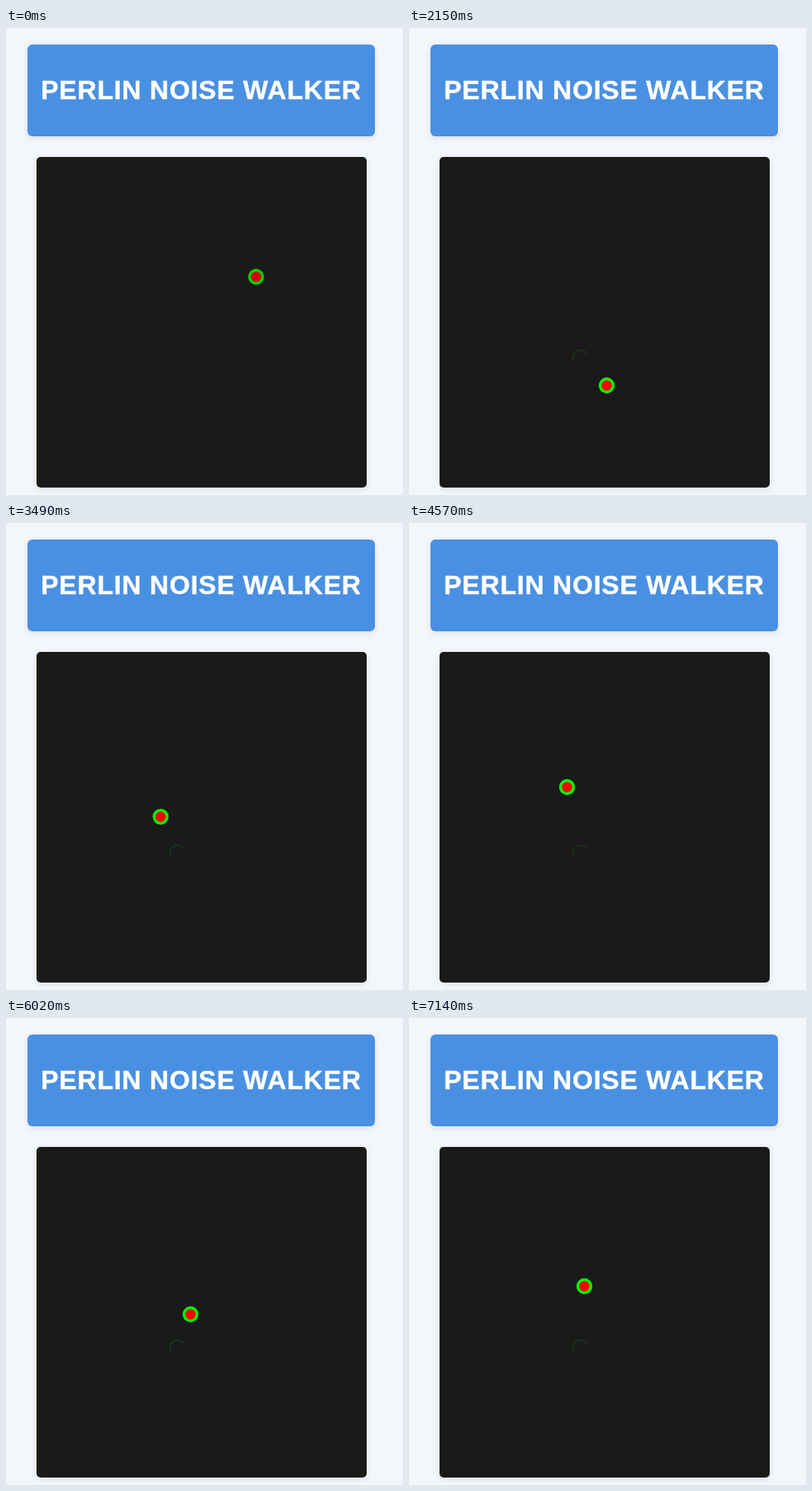
Write an HTML page that moves like this. It is 481 px wide and 565 px high and loops after 8 s.

```html
<!DOCTYPE html>
<html lang="en">
<head>
<meta charset="utf-8">
<title>Perlin Noise Walker</title>
<style>
  html, body { margin: 0; width: 100%; height: 100%; overflow: hidden; background: #f3f6fb; }
  h1, svg { position: absolute; margin: 0; box-shadow: 0 2px 8px rgba(0, 0, 0, .1); }
  h1 {
    left: 26px; top: 20px; width: 421px; height: 111px; border-radius: 6px;
    background: #4a90e2; color: #fff; text-align: center; white-space: nowrap;
    font: bold 32px/110px "Liberation Sans", Arial, sans-serif; letter-spacing: .8px;
    -webkit-text-stroke: .4px #fff;
  }
  svg { left: 37px; top: 156px; border-radius: 5px; background: #1a1a18; }
</style>
</head>
<body>
<h1>PERLIN NOISE WALKER</h1>
<svg width="400" height="400" viewBox="37 156 400 400">
  <path id="trail" fill="none" stroke="#1a1a1c" stroke-width="19" stroke-linecap="round"/>
  <path id="arc" d="M199.2 402.5A9.4 9.4 0 0 1 216.3 394.8" fill="none" stroke="#1a331b" stroke-width="2"/>
  <circle id="walker" r="8" fill="#f00" stroke="#0f0" stroke-width="3.3"/>
</svg>
<script>
const LOOP = 8000, STEP = 67;

// Turning points of the walk: time, x, y
const path = [
  [0, 303, 301], [680, 200, 329], [1030, 226.5, 360.5], [1480, 208, 399],
  [2150, 239.5, 432.5], [2720, 251, 441], [3340, 217, 375], [3490, 187.5, 355.5],
  [3900, 139, 304], [4180, 166, 294], [4570, 191.5, 319.5], [5260, 162, 324],
  [6020, 223.5, 358.5], [6650, 288, 301], [6860, 341, 261], [7140, 212.5, 324.5]
];
const end = path.at(-1)[0];

const slope = (i, d) => (path[i + 1][d] - path[i][d]) / (path[i + 1][0] - path[i][0]);

// Flat at turning points, harmonic mean of the slopes elsewhere
function tangent(i, d) {
  if (i === 0 || i === path.length - 1) return 0;
  const a = slope(i - 1, d), b = slope(i, d);
  return a * b > 0 ? 2 * a * b / (a + b) : 0;
}

function coord(t, d) {
  let i = 0;
  while (i < path.length - 2 && path[i + 1][0] <= t) i++;
  const h = path[i + 1][0] - path[i][0], u = (t - path[i][0]) / h, v = 1 - u;
  return path[i][d] * (1 + 2 * u) * v * v + path[i + 1][d] * (3 - 2 * u) * u * u
    + h * u * v * (tangent(i, d) * v - tangent(i + 1, d) * u);
}

const set = (id, attrs) => {
  for (const name in attrs) document.getElementById(id).setAttribute(name, attrs[name]);
};

function draw() {
  const t = Math.min(performance.now() % LOOP, end);
  let dots = "";
  for (let s = 0; s < t; s += STEP) dots += `M${coord(s, 1)} ${coord(s, 2)}h.01`;
  set("trail", { d: dots });
  set("arc", { visibility: t > 1540 ? "visible" : "hidden" });
  set("walker", { cx: coord(t, 1), cy: coord(t, 2), opacity: Math.min(1, .8 + t / 350) });
  requestAnimationFrame(draw);
}
draw();
</script>
</body>
</html>
```
